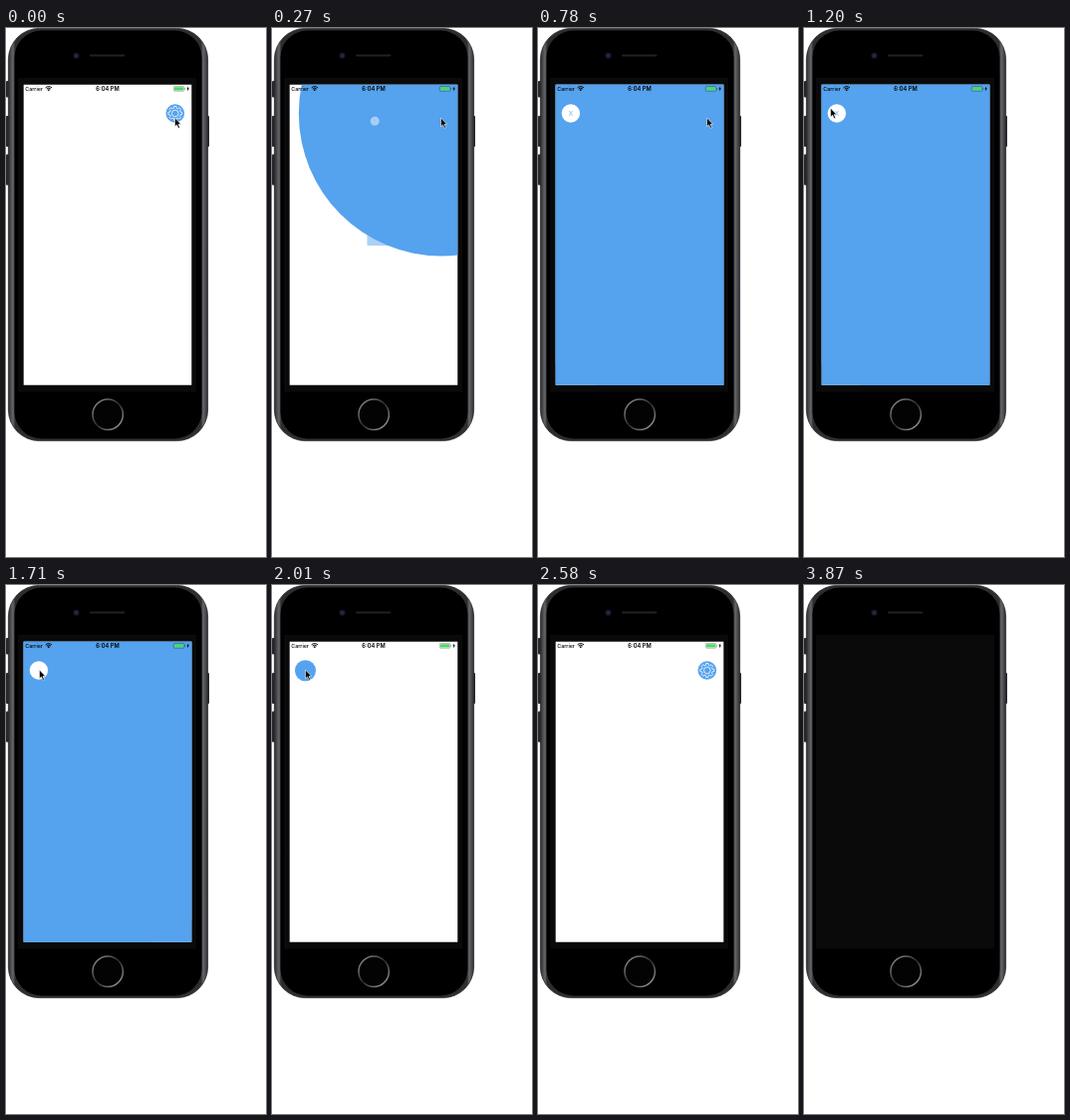
An HTML page that plays this animation: 261x530 px, repeating every 4570 ms.

```html
<!DOCTYPE html>
<html lang="en">
<head>
<meta charset="utf-8">
<title>Circular transition</title>
<style>
  html, body { margin: 0; width: 100%; height: 100%; overflow: hidden; background: #fff; }
  svg { display: block; width: 261px; height: 530px; }
  text { font-family: Inter, "Liberation Sans", sans-serif; }
</style>
</head>
<body>
<svg viewBox="0 0 261 530">
  <defs>
    <linearGradient id="ring" x1="0" y1="0" x2="1" y2="1">
      <stop offset=".1" stop-color="#8a8a8c"/>
      <stop offset=".5" stop-color="#2a2a2c"/>
      <stop offset=".9" stop-color="#98989a"/>
    </linearGradient>
    <linearGradient id="side">
      <stop offset="0" stop-color="#2a2b2d"/>
      <stop offset=".012" stop-color="#4a4b4e"/>
      <stop offset=".023" stop-color="#66676a"/>
      <stop offset=".034" stop-color="#2c2d2f"/>
      <stop offset=".966" stop-color="#2c2d2f"/>
      <stop offset=".977" stop-color="#66676a"/>
      <stop offset=".988" stop-color="#4a4b4e"/>
      <stop offset="1" stop-color="#2a2b2d"/>
    </linearGradient>
    <clipPath id="glass"><rect x="17.700" y="56.700" width="168.600" height="301"/></clipPath>
  </defs>

  <g id="phone">
    <g fill="#29292b">
      <rect x="0" y="53" width="4" height="16.500" rx="1"/>
      <rect x="0" y="88" width="4" height="31" rx="1"/>
      <rect x="0" y="126.500" width="4" height="31" rx="1"/>
      <rect x="200.500" y="88" width="3.500" height="31" rx="1"/>
    </g>
    <rect x="2.400" y=".4" width="200.200" height="413.200" rx="31" fill="url(#side)" stroke="#2a2b2d" stroke-width=".8"/>
    <rect x="8.500" y="2.600" width="188" height="408.800" rx="27" fill="#000"/>
    <rect x="12" y="50" width="179" height="314.500" fill="#0a0a0a"/>
    <rect x="84" y="26.500" width="35.500" height="2" rx="1" fill="#222224"/>
    <circle cx="70.500" cy="27.700" r="3" fill="#181b2c"/>
    <circle cx="70.500" cy="27.700" r="1.500" fill="#232c55"/>
    <circle cx="102.200" cy="387.300" r="15.200" fill="#030303" stroke="url(#ring)" stroke-width="1.500"/>
  </g>

  <g id="screen" clip-path="url(#glass)">
    <rect x="17" y="56" width="170" height="302" fill="#fff"/>
    <g id="gear">
      <circle r="9.300" fill="#55a2ee"/>
      <g fill="none" stroke="#fff" stroke-width=".8" stroke-linejoin="round">
        <path id="teeth"/>
        <circle r="3.300"/>
      </g>
    </g>
    <circle id="bubble" fill="#55a2ee"/>
    <g id="panel">
      <rect x="17" y="56" width="170" height="302" fill="#55a2ee"/>
      <g id="close">
        <circle cx="32.900" cy="85.500" r="9.200" fill="#fff"/>
        <text id="cross" x="32.900" y="88" font-size="6.800" text-anchor="middle" fill="#55a2ee">X</text>
      </g>
    </g>
    <g id="status" fill="#000">
      <text x="19.300" y="63" font-size="5.300" font-weight="500">Carrier</text>
      <text x="102" y="63" font-size="5.700" font-weight="600" text-anchor="middle">6:04 PM</text>
      <path d="M42.800 63.300 41.600 61.900A1.800 1.800 0 0 1 44 61.900Z"/>
      <g fill="none" stroke="#000" stroke-width=".95">
        <path d="M40.700 61.100A3 3 0 0 1 44.900 61.100"/>
        <path d="M39.600 59.900A4.600 4.600 0 0 1 46 59.900"/>
      </g>
      <rect x="168.300" y="58.500" width="10.600" height="4.800" rx="1.100" fill="none" stroke="#000" stroke-opacity=".5" stroke-width=".5"/>
      <rect x="169" y="59.200" width="9.200" height="3.400" rx=".5" fill="#4cd964"/>
      <rect x="179.400" y="60.200" width=".6" height="1.500" fill-opacity=".5"/>
      <path d="M183.300 58.300 181.300 61.300H182.500L181.900 63.600 184 60.500H182.800Z"/>
    </g>
    <path id="cursor" d="M0 0V8.800L2 6.900 3.500 10.400 5 9.700 3.500 6.400H6.200Z" fill="#000" stroke="#fff" stroke-width=".6"/>
  </g>
</svg>
<script>
const LOOP = 4570, STEP = 30;
const OPEN = 210, PRESS = 1530, CLOSE = 1710, SLIDE = 2080, OFF = 3870;
const RATE = 11.1 / 1000, MAX_R = 294;
const HOME = { x: 169.8, y: 85.5 }, LEFT = { x: 33.5, y: 85.8 }, MID = { x: 102, y: 207 };

// Cursor tip: time, x, y
const TRACK = [
  [0, 169.5, 90], [870, 169.5, 90], [930, 150, 74], [1020, 84, 58],
  [1110, 38, 64], [1170, 20, 78], [1260, 40, 85], [1380, 36, 84.5],
  [1530, 33.5, 85], [2010, 33.5, 85], [2100, 38.5, 89],
  [2250, 50, 97], [2370, 94, 108], [2460, 138, 92], [2550, 182, 65], [2580, 195, 60]
];

const $ = id => document.getElementById(id);
const [gear, bubble, panel, closer, cross, screen, cursor] =
  ["gear", "bubble", "panel", "close", "cross", "screen", "cursor"].map($);
const set = (el, attrs) => { for (const k in attrs) el.setAttribute(k, attrs[k]); };
const show = (el, on) => set(el, { visibility: on ? "inherit" : "hidden" });
const decay = ms => Math.exp(-RATE * Math.max(0, ms));
const mix = (a, b, p) => a + (b - a) * p;

function gearPath(teeth, inner, outer) {
  const pts = [];
  for (let i = 0; i < teeth; i++)
    for (const [f, r] of [[-.32, inner], [-.2, outer], [.2, outer], [.32, inner]]) {
      const a = (i + f) / teeth * 2 * Math.PI;
      pts.push((r * Math.sin(a)).toFixed(2) + " " + (-r * Math.cos(a)).toFixed(2));
    }
  return "M" + pts.join("L") + "Z";
}

function tipAt(t) {
  const i = TRACK.findIndex(k => k[0] > t);
  if (i < 0) return null;
  const [t0, x0, y0] = TRACK[i - 1], [t1, x1, y1] = TRACK[i];
  const u = (t - t0) / (t1 - t0);
  return [mix(x0, x1, u), mix(y0, y1, u)];
}

// The panel and its bubble grow out of, or shrink into, one point
function transition(p, from) {
  set(bubble, { cx: from.x, cy: from.y, r: MAX_R * p });
  const x = mix(from.x, MID.x, p), y = mix(from.y, MID.y, p);
  set(panel, {
    transform: `translate(${x} ${y}) scale(${p}) translate(${-MID.x} ${-MID.y})`,
    opacity: p
  });
}

function draw(now) {
  const t = Math.floor(now % LOOP / STEP) * STEP;
  show(screen, t < OFF);

  const active = t >= OPEN && t < 2220;
  show(bubble, active);
  show(panel, active);
  if (active) {
    const opening = t < CLOSE;
    let p = opening ? 1 - decay(t - OPEN) : decay(t - CLOSE);
    if (opening && t >= 750) p = 1;
    transition(p, opening ? HOME : LEFT);
    const drop = opening ? 16 * Math.min(1, 2 * (1 - p)) : 0;
    set(closer, { transform: `translate(0 ${drop})` });
    set(cross, { opacity: t < PRESS ? .8 * p : .1 });
  }

  const slid = t < CLOSE || t >= 2580 ? 1 : 1 - decay(t - SLIDE);
  set(gear, { transform: `translate(${mix(LEFT.x, HOME.x, slid)} ${HOME.y})` });

  const tip = tipAt(t);
  show(cursor, tip);
  if (tip) set(cursor, { transform: `translate(${tip})` });
}

set($("teeth"), { d: gearPath(8, 5.4, 7.1) });
const start = performance.now();
function tick() {
  draw(performance.now() - start);
  requestAnimationFrame(tick);
}
tick();
</script>
</body>
</html>
```
